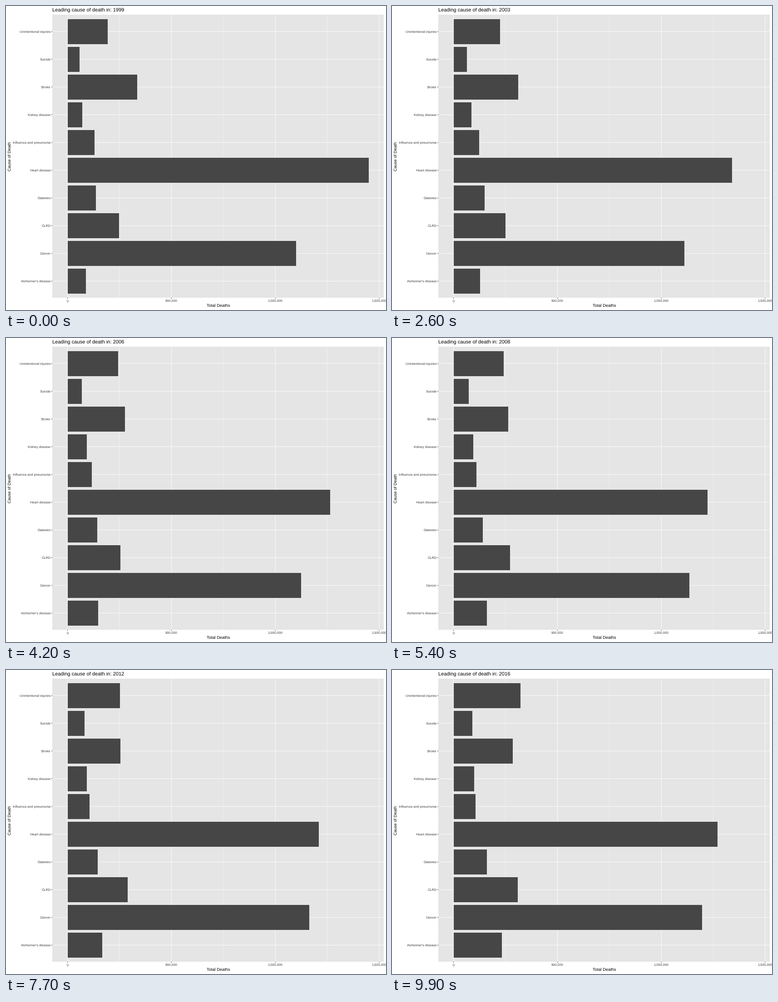
A matplotlib script that plays this animation: 837 by 669 pixels, repeating every 10 s.

```python
import numpy as np
import matplotlib.pyplot as plt
from matplotlib.animation import FuncAnimation
from matplotlib.patches import Rectangle

W, H, DPI = 837, 669, 64
FRAMES, INTERVAL = 100, 100
FIRST, LAST = 1999, 2016

LEFT, RIGHT, TOP, BOTTOM = 102.3, 832.4, 19.4, 642.0
ZERO, PER_MILLION = 135.55, 457.6
ROW_TOP, ROW_STEP = 56.05, 61.05
BAR_H = 0.9 * ROW_STEP

PANEL, BAR, LABEL, TICK = "#e5e5e5", "#464646", "#3b3b3b", "#242424"

# A few turning points per cause, evenly spread over the years, in thousands.
CAUSES = {
    "Unintentional injuries": (97, 107.5, 121.5, 120, 127, 161),
    "Suicide": (29.2, 32.5, 38.2, 45),
    "Stroke": (168, 162.5, 139, 129.5, 127.5, 142),
    "Kidney disease": (35.5, 42.5, 48, 46.5, 50),
    "Influenza and pneumonia": (65, 60.5, 52.5, 52.5),
    "Heart disease": (725, 698, 650, 617, 596, 609, 635),
    "Diabetes": (68.4, 75, 69.5, 72, 80),
    "CLRD": (124, 124.5, 125, 140, 145, 155),
    "Cancer": (550, 557.5, 574, 598),
    "Alzheimer's disease": (44.5, 60.5, 72.5, 82.5, 84, 116),
}
SCALE = 2 / 1000  # each death is counted twice; result in millions

plt.rcParams.update({"font.family": "Liberation Sans", "text.hinting": "none"})
fig = plt.figure(figsize=(W / DPI, H / DPI), dpi=DPI, facecolor="white")
ax = fig.add_axes([0, 0, 1, 1])
ax.set(xlim=(0, W), ylim=(H, 0))
ax.axis("off")


def pt(px):
    return px * 72 / DPI


def x_of(millions):
    return ZERO + PER_MILLION * millions


def line(x0, y0, x1, y1, color="white", width=0.9, z=2):
    ax.plot([x0, x1], [y0, y1], color=color, lw=pt(width), zorder=z,
            solid_capstyle="butt", snap=False)


def rect(x, y, w, h, color, z):
    return ax.add_patch(Rectangle((x, y), w, h, fc=color, lw=0, zorder=z, snap=True))


def text(x, y, s, size, color="black", ha="center", **kw):
    return ax.text(x, y, s, fontsize=pt(size), color=color, ha=ha,
                   va="baseline", zorder=5, **kw)


def bar_path(points):
    """Bar length in pixels for every frame, linear between the points."""
    keys = np.linspace(0, FRAMES - 1, len(points))
    return np.interp(np.arange(FRAMES), keys, points) * SCALE * PER_MILLION


rect(LEFT, TOP, RIGHT - LEFT, BOTTOM - TOP, PANEL, 0)

for m in (0.25, 0.75, 1.25):
    line(x_of(m), TOP, x_of(m), BOTTOM, width=0.45, z=1)
for m in (0, 0.5, 1, 1.5):
    x = x_of(m)
    line(x, TOP, x, BOTTOM)
    line(x, BOTTOM, x, BOTTOM + 2.3, TICK)
    text(x, 651.6, f"{m * 1e6:,.0f}", 7.38, LABEL)

bars = []
for row, (name, points) in enumerate(CAUSES.items()):
    y = ROW_TOP + row * ROW_STEP
    line(LEFT, y, RIGHT, y)
    line(LEFT - 2.3, y, LEFT, y, TICK)
    text(98.4, y + 2.6, name, 7.38, LABEL, ha="right")
    path = bar_path(points)
    bars.append((rect(ZERO, y - BAR_H / 2, path[0], BAR_H, BAR, 3), path))

text((LEFT + RIGHT) / 2, 662.0, "Total Deaths", 9.23)
text(11.4, (TOP + BOTTOM) / 2, "Cause of Death", 9.23,
     rotation=90, rotation_mode="anchor")
title = text(LEFT, 12.9, "", 11.07, ha="left")


def update(i):
    year = round(FIRST + (LAST - FIRST) * i / (FRAMES - 1))
    title.set_text(f"Leading cause of death in: {year}")
    for bar, path in bars:
        bar.set_width(path[i])
    return [title] + [bar for bar, _ in bars]


anim = FuncAnimation(fig, update, frames=FRAMES, interval=INTERVAL,
                     repeat=True, repeat_delay=0)
plt.show()
```
